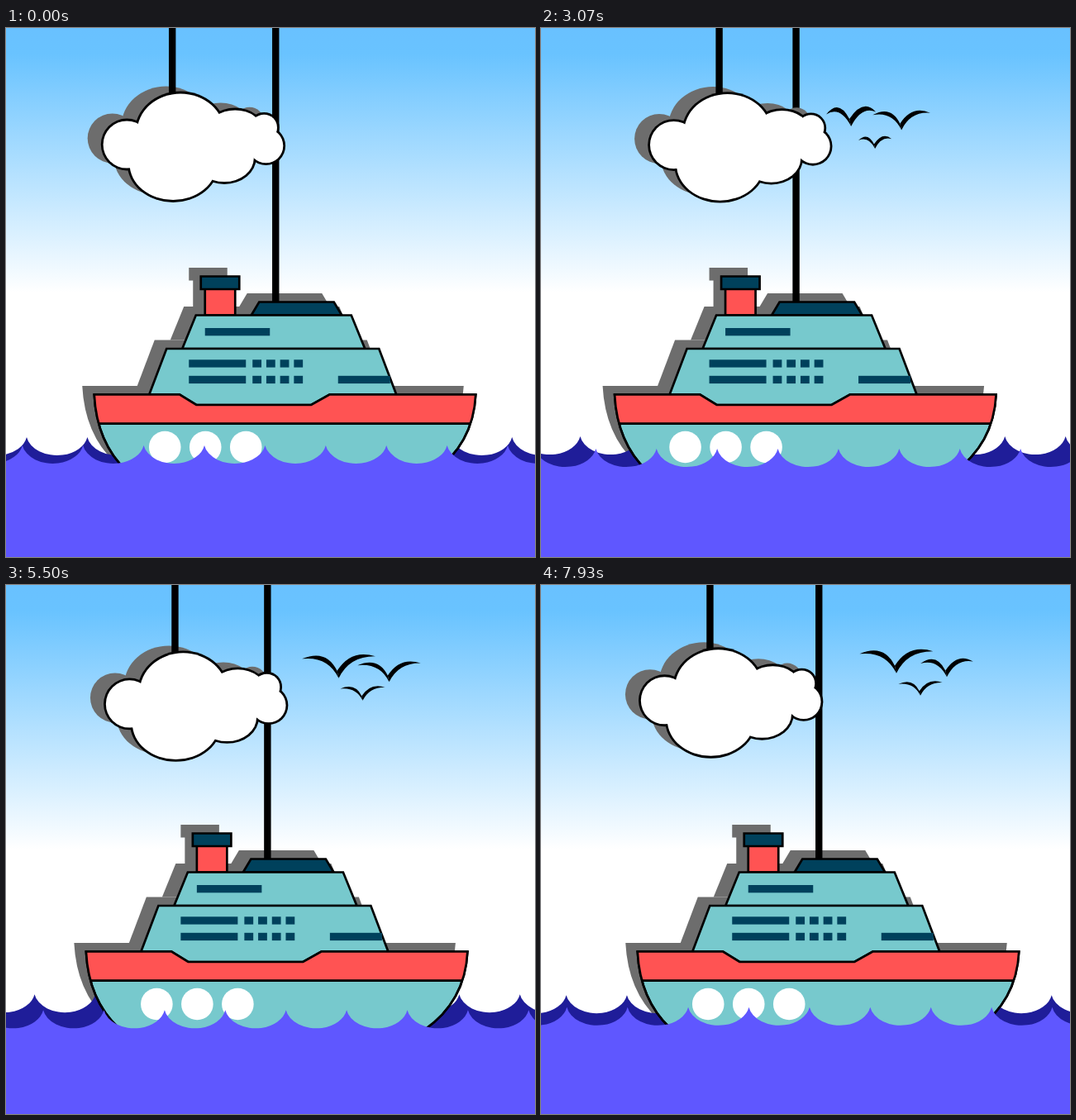
Recreate the animation shown at these times as an HTML page with a canvas. Size 640 by 640 pixels, loop 8000 ms.

```html
<!DOCTYPE html>
<html>
<head>
<meta charset="utf-8">
<title>Paper ship</title>
<style>
  html, body { margin: 0; height: 100%; overflow: hidden; }
  canvas { display: block; width: 100vmin; height: 100vmin; }
</style>
</head>
<body>
<canvas id="stage" width="640" height="640"></canvas>
<script>
const ctx = document.getElementById('stage').getContext('2d');
const LOOP = 8000, STEPS = 112;
const CYCLE = 7.17, W = 2 * Math.PI / CYCLE;
const TEAL = '#77c9cd', RED = '#ff5353', NAVY = '#00415c', GREY = '#6d6d6d';

const sky = ctx.createLinearGradient(0, 0, 0, 320);
sky.addColorStop(0, '#69c1ff');
sky.addColorStop(0.1, '#69c3ff');
sky.addColorStop(1, '#fff');

const clamp = v => Math.max(0, Math.min(1, v));
const swing = (t, peak, speed = W) => Math.cos(speed * (t - peak));

function at(x, y, draw) {
  ctx.save();
  ctx.translate(x, y);
  draw();
  ctx.restore();
}

function block(color, x, y, width, height) {
  ctx.fillStyle = color;
  ctx.fillRect(x, y, width, height);
}

function ellipse(color, x, y, rx, ry = rx) {
  ctx.fillStyle = color;
  ctx.beginPath();
  ctx.ellipse(x, y, rx, ry, 0, 0, 7);
  ctx.fill();
}

// Box whose sides lean inwards by `lean` towards the top
const deck = (left, right, top, bottom, lean) =>
  new Path2D(`M${left} ${bottom}L${left + lean} ${top}H${right - lean}L${right} ${bottom}Z`);

const hull = new Path2D('M106.5 443.5H210L230 456H369L391 443.5H568' +
  'Q565 504 516 538L480 565H175L146 536Q109.5 502 106.5 443.5Z');

function shipParts(paint) {
  paint(deck(240.5, 277, 315.5, 347.5, 0), RED);
  paint(deck(235.5, 282, 300.5, 316, 0), NAVY);
  paint(deck(296.5, 406, 331.5, 347.5, 9.5), NAVY);
  paint(deck(213, 434, 347.5, 388, 16.5), TEAL);
  paint(deck(173, 472, 388, 443.5, 21), TEAL);
  block(TEAL, 210, 442, 181, 14);
  paint(hull, TEAL);
}

function drawShipShadow() {
  shipParts(path => {
    ctx.fillStyle = GREY;
    ctx.fill(path);
  });
}

function drawShip() {
  ctx.strokeStyle = '#000';
  ctx.lineWidth = 2.7;
  shipParts((path, color) => {
    ctx.fillStyle = color;
    ctx.fill(path);
    ctx.stroke(path);
  });
  ctx.save();
  ctx.clip(hull);
  block(RED, 100, 440, 480, 38.5);
  block('#000', 100, 477.2, 480, 2.8);
  ctx.restore();
  ctx.stroke(hull);

  block(NAVY, 240.5, 363, 78.5, 9.3);
  for (const y of [401.3, 420.8]) {
    block(NAVY, 221, y, 69, 9.3);
    for (let i = 0; i < 4; i++) block(NAVY, 298 + 16.7 * i, y, 10.8, 9.3);
  }
  block(NAVY, 401.5, 420.8, 63, 9.3);
  for (let i = 0; i < 3; i++) ellipse('#fff', 192 + 49 * i, 507, 19.3);
}

// Scalloped sea surface: elliptical troughs meeting in sharp crests
function drawSea(crestX, troughY, color) {
  const span = 73.4, rx = 37.3, ry = 26.8;
  const edge = Math.acos(span / 2 / rx);
  ctx.beginPath();
  ctx.moveTo(-200, 640);
  for (let x = crestX - 1.5 * span; x < 740; x += span)
    ctx.ellipse(x, troughY - ry, rx, ry, 0, Math.PI - edge, edge, true);
  ctx.lineTo(800, 640);
  ctx.fillStyle = color;
  ctx.fill();
}

// One wing from the body to its tip and back
function drawWing(side, spread) {
  const tipX = side * (30 + 14.5 * spread), tipY = -16 - 9 * spread - 1.5 * side;
  const top = -34 - 2 * spread;
  ctx.beginPath();
  ctx.moveTo(0, 0);
  ctx.lineTo(-2, -9);
  ctx.quadraticCurveTo(side * 15, top, tipX, tipY);
  ctx.quadraticCurveTo(side * 13, top + 9, 0, 0);
  ctx.fill();
}

// The later a bird appears, the later it folds its wings
const birds = [
  { x: 61, y: 4.5, size: 0.86 },
  { x: 29, y: 27, size: 0.61 },
  { x: 0, y: 0, size: 1 },
];

function drawBirds(t) {
  birds.forEach(({ x, y, size }, i) => {
    const gap = Math.abs(t % CYCLE - (1.82 + 0.42 * i));
    const k = clamp((Math.min(gap, CYCLE - gap) - 0.5) / 1.15);
    const spread = k * k * (3 - 2 * k);
    at(340.4 + 11.3 * t + x, 126.6 - 2.5 * t + y, () => {
      ctx.scale(size, size);
      ctx.globalAlpha = clamp((t - 0.5 - 0.25 * i) / 0.6);
      ctx.fillStyle = '#000';
      drawWing(-1, spread);
      drawWing(1, spread);
    });
  });
}

function drawPuffs(color, grow) {
  const puff = (x, y, rx, ry = rx) => ellipse(color, x, y, rx + grow, ry + grow);
  puff(146, 141.5, 30);
  puff(211, 126.5, 54, 48);
  puff(202, 165, 54, 45);
  puff(277, 125.5, 35, 27);
  puff(264, 158, 37, 30);
  puff(312, 121, 17.2);
  puff(314.3, 143, 22.2);
}

function drawRope(x, bottom) {
  block('#000', x - 4.2, -20, 8.4, bottom + 20);
}

function drawCloud() {
  at(-17.5, -7.5, () => drawPuffs(GREY, 0));
  drawRope(201, 82);
  drawPuffs('#000', 1.4);
  drawPuffs('#fff', -1.4);
}

function render(t) {
  const phase = t % CYCLE;
  const sway = Math.min(phase, CYCLE - phase);
  const drift = Math.min(phase / 3.15, (CYCLE - phase) / (CYCLE - 3.15));
  const shipX = 2.1 - 19.7 * swing(t, 3.37, W / 2);

  block(sky, 0, 0, 640, 640);
  at(shipX - 14.5, -10.5, drawShipShadow);
  at(shipX, 0, () => drawRope(326, 332));
  drawSea(25 + 23 * drift, 517.1 + 0.7 * swing(t, 0.9) + 0.8 * swing(t, 1.4, 2 * W), '#1f1d99');
  at(shipX, 0, drawShip);
  drawSea(19.8 + 15.15 * sway, 526.9 + 9.5 * Math.sin(W * sway), '#5f57ff');
  drawBirds(t);
  at(7.1 + 7.5 * swing(t, 3.13), 0.3 - 2.4 * swing(t, 1.4), drawCloud);
}

// Motion advances in fourteen steps per second
function tick() {
  const step = Math.floor((performance.now() % LOOP + 5) * STEPS / LOOP) % STEPS;
  render(step * LOOP / STEPS / 1000);
  requestAnimationFrame(tick);
}
tick();
</script>
</body>
</html>
```
